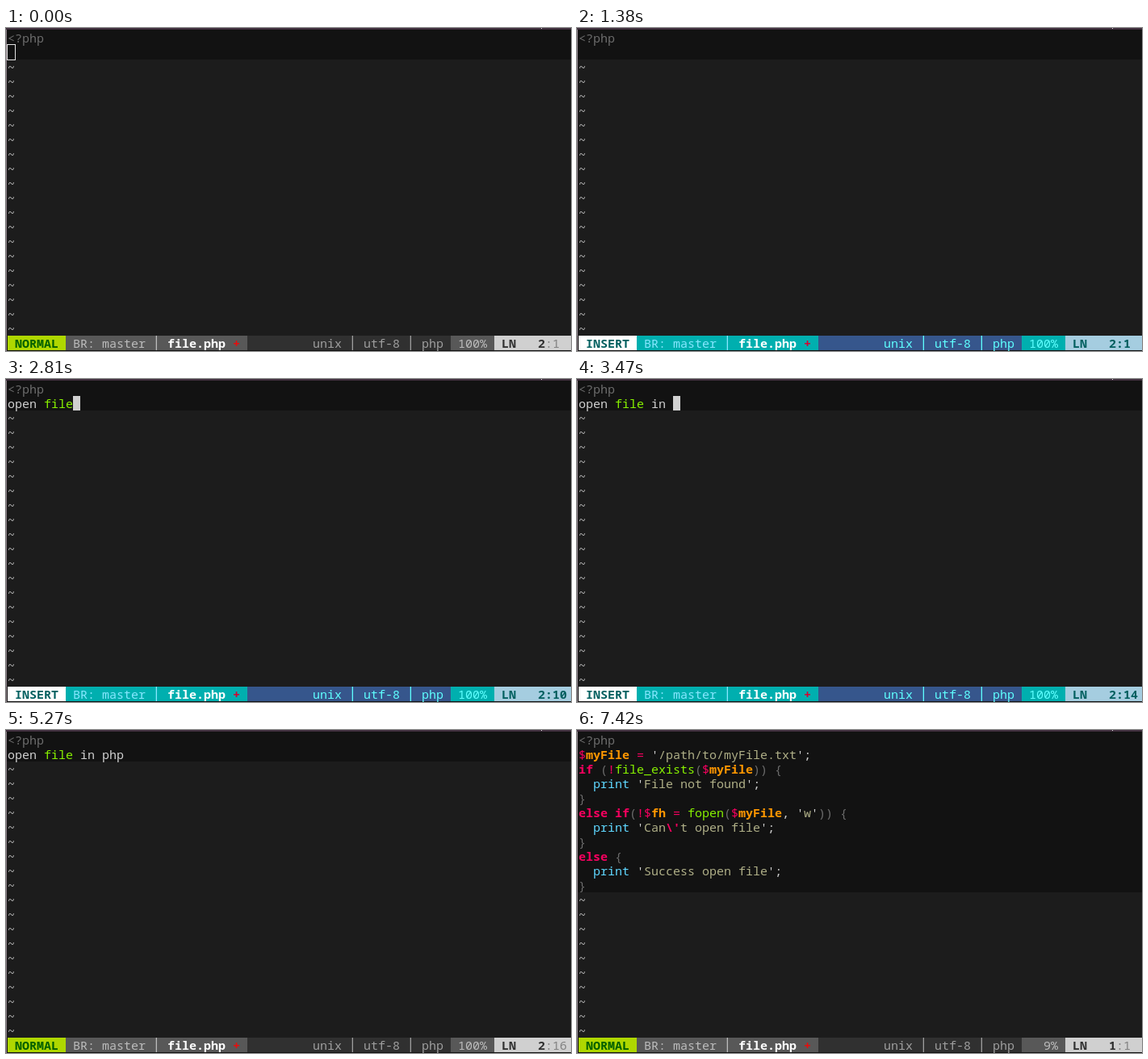
An HTML page with a canvas for the animation above (7840 ms loop, 700x400 px).

```html
<!DOCTYPE html>
<html lang="en">
<head>
<meta charset="utf-8">
<title>Editor session</title>
<style>
html, body { margin: 0; height: 100%; overflow: hidden; background: #121212; }
canvas { display: block; }
</style>
</head>
<body>
<canvas id="stage" width="700" height="400"></canvas>
<script>
const ctx = document.getElementById('stage').getContext('2d');
const LOOP = 7840, LEFT = 2, TOP = 3, CELL_W = 9, CELL_H = 18, STATUS_ROW = 21;
const BASELINE = 15, BG = '#121212';

// Moments of the single changes, in ms
const FOCUS = 260, INSERT = 1380, ESCAPE = 4740, NORMAL = 4830, EXPAND = 5640;
const KEYS = [1910, 1990, 2060, 2140, 2290, 2490, 2580, 2660, 2810, 2950,
  3180, 3270, 3470, 3710, 3940, 4080];
const CURSOR_OFF = [[910, 1830], [4640, ESCAPE], [5270, EXPAND], [6210, 6820], [7420, LOOP]];
const PHRASE = 'open file in php';

// Markup: one style letter followed by its text in brackets
const STYLES = {
  w: ['#d0d0d0'], d: ['#6c6c6c'], r: ['#f5005f'], k: ['#f5005f', 'bold'],
  o: ['#ff9700', 'bold'], g: ['#87f000'], s: ['#afaf87'], c: ['#5fd7ff']
};
const CODE = [
  'd[<?php]',
  "r[$]o[myFile]w[ ]r[=]w[ ']s[/path/to/myFile.txt]w[';]",
  'k[if]d[ (]r[!]g[file_exists]d[(]r[$]o[myFile]d[)) {]',
  "c[  print]w[ ']s[File not found]w[';]",
  'd[}]',
  "k[else if]d[(]r[!$]o[fh]r[ = ]g[fopen]d[(]r[$]o[myFile]w[, ']s[w]w[']d[)) {]",
  "c[  print]w[ ']s[Can]k[\\']s[t open file]w[';]",
  'd[}]',
  'k[else]d[ {]',
  "c[  print]w[ ']s[Success open file]w[';]",
  'd[}]'
];

const BARS = {
  NORMAL: {
    modeBg: '#afd700', mode: '#005f00', fileBg: '#585858', branch: '#bcbcbc',
    bg: '#303030', info: '#9e9e9e', percent: '#bcbcbc',
    lineBg: '#d0d0d0', line: '#303030', column: '#808080', columnWeight: '', plus: '#e80c0c'
  },
  INSERT: {
    modeBg: '#ffffff', mode: '#005f5f', fileBg: '#00afaf', branch: '#87e7ff',
    bg: '#36568c', info: '#5fffff', percent: '#5fffff',
    lineBg: '#a5cde0', line: '#005f5f', column: '#005f5f', columnWeight: 'bold', plus: '#d70030'
  }
};

const cellX = col => LEFT + col * CELL_W;
const cellY = row => TOP + row * CELL_H;

function rect(x, y, w, h, color) {
  ctx.fillStyle = color;
  ctx.fillRect(x, y, w, h);
}

function text(str, col, row, color, weight = '') {
  ctx.font = `${weight} 15px "Noto Sans Mono", monospace`;
  ctx.fillStyle = color;
  [...str].forEach((ch, i) => ctx.fillText(ch, cellX(col + i), cellY(row) + BASELINE));
}

function markup(line, row) {
  let col = 0;
  for (const [, style, str] of line.matchAll(/([a-z])\[(.*?)\]/g)) {
    text(str, col, row, ...STYLES[style]);
    col += str.length;
  }
}

function statusBar(mode, line, column, percent) {
  const c = BARS[mode], y = cellY(STATUS_ROW);
  const band = (from, color) => rect(cellX(from), y, 700 - cellX(from), CELL_H, color);
  const put = (str, col, color, weight) => text(str, col, STATUS_ROW, color, weight);
  const divider = (col, color) => rect(cellX(col) + 3.7, y, 1.3, CELL_H, color);

  band(0, c.modeBg);
  band(8, c.fileBg);
  band(33, c.bg);
  band(61, c.fileBg);
  band(67, c.lineBg);

  put(mode, 1, c.mode, 'bold');
  put('BR: master', 9, c.branch);
  divider(20, c.branch);
  put('file.php', 22, '#ffffff', 'bold');
  put('+', 31, c.plus, 'bold');
  put('unix', 42, c.info);
  divider(47, c.info);
  put('utf-8', 49, c.info);
  divider(55, c.info);
  put('php', 57, c.info);
  put(percent.padStart(4), 62, c.percent);
  put('LN', 68, c.line, 'bold');
  put(String(line), 73, c.line, 'bold');
  put(':' + column, 74, c.column, c.columnWeight);
}

function cursor(t, typed, expanded) {
  if (t < FOCUS) {
    ctx.strokeStyle = '#e4e4e4';
    ctx.strokeRect(1.5, 20.5, 10, 19);
    return;
  }
  if (CURSOR_OFF.some(([from, to]) => t >= from && t < to)) return;
  const row = expanded ? 0 : 1;
  const col = expanded ? 0 : t < ESCAPE ? typed.length : typed.length - 1;
  rect(cellX(col), cellY(row), CELL_W, CELL_H, expanded ? '#767676' : '#d0d0d0');
  text(expanded ? '<' : typed[col] || '', col, row, BG);
}

function draw(t) {
  const expanded = t >= EXPAND;
  const typed = PHRASE.slice(0, KEYS.filter(k => k <= t).length);
  const lines = expanded ? CODE
    : [CODE[0], `w[${typed.replace('file', ']g[file]w[')}]`];

  rect(0, 0, 700, 400, BG);
  rect(1, cellY(lines.length), 699, cellY(STATUS_ROW) - cellY(lines.length), '#1c1c1c');
  rect(0, 0, 700, 2, '#41303f');
  rect(0, 2, 1, 398, '#8d8089');
  if (t < FOCUS || t >= 420) rect(663, 0, 1, 1, '#e0e0e0');

  lines.forEach(markup);
  for (let row = lines.length; row < STATUS_ROW; row++) text('~', 0, row, '#bcbcbc');

  const mode = t >= INSERT && t < NORMAL ? 'INSERT' : 'NORMAL';
  const column = expanded ? 1 : t >= NORMAL ? typed.length : typed.length + 1;
  statusBar(mode, expanded ? 1 : 2, column, expanded ? '9%' : '100%');
  cursor(t, typed, expanded);
}

const start = performance.now();
function tick() {
  draw((performance.now() - start) % LOOP);
  requestAnimationFrame(tick);
}
tick();
</script>
</body>
</html>
```
